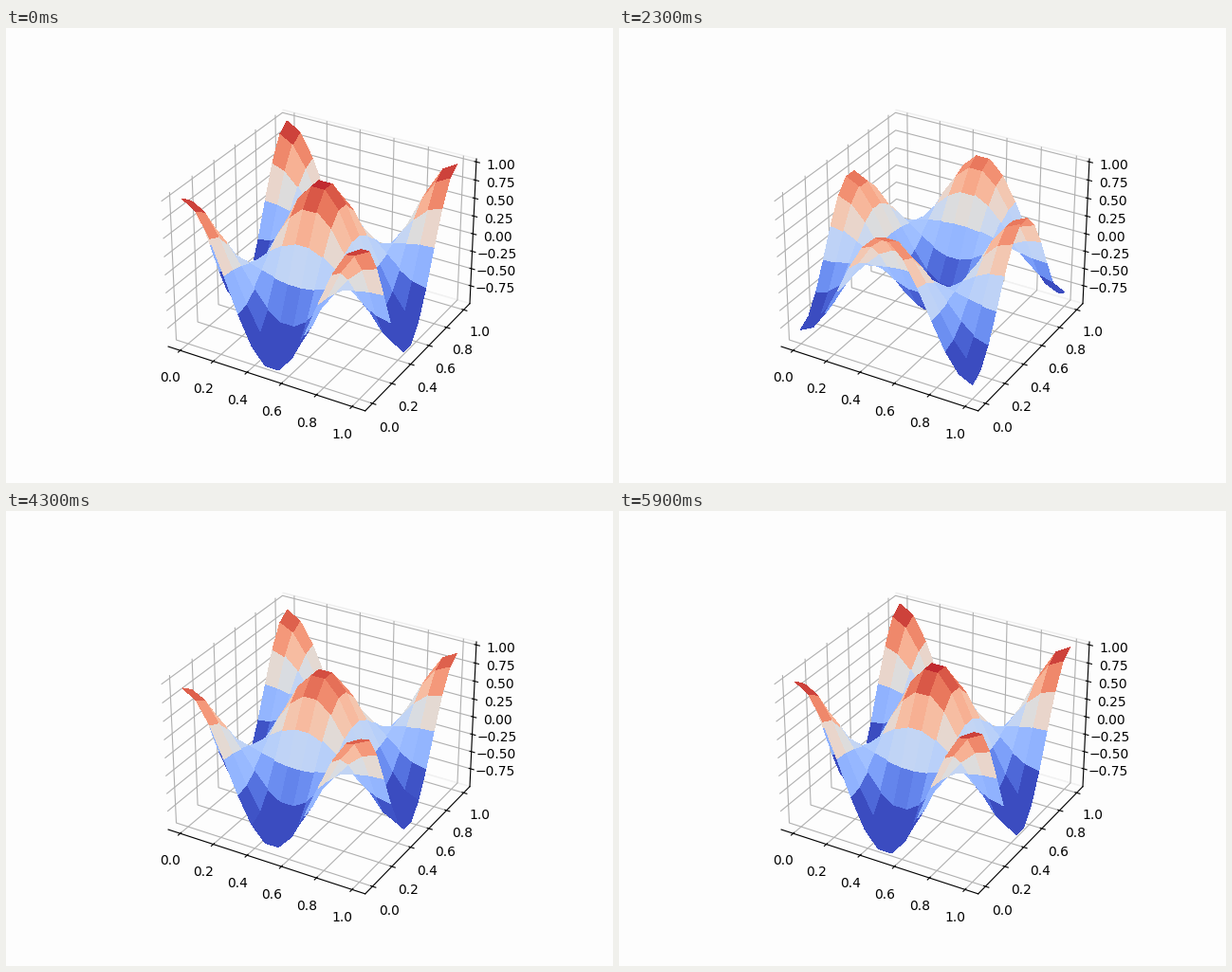
These frames come from a looping animation (640x480 px, 6100 ms). A matplotlib script:

```python
import numpy as np
import matplotlib.pyplot as plt
from matplotlib.animation import FuncAnimation

STEPS = 60      # time steps in one loop, plus one held at the start
PERIOD = 15     # steps in one oscillation
POINTS = 14
PAPER = "#fdfdfd"

grid = np.linspace(0, 1, POINTS)
X, Y = np.meshgrid(grid, grid)
SHAPE = np.cos(2 * np.pi * X) * np.cos(2 * np.pi * Y)

fig = plt.figure(figsize=(6.4, 4.8), dpi=100, facecolor=PAPER)
ax = fig.add_subplot(projection="3d", facecolor=PAPER)


def padded(low, high):
    pad = (high - low) / 48
    return low - pad, high + pad


ax.set_xlim(*padded(-0.05, 1.05))
ax.set_ylim(*padded(-0.05, 1.05))
ax.set_zlim(*padded(SHAPE.min(), SHAPE.max()))
ax.set_zticks(np.arange(-0.75, 1.01, 0.25))

for axis, edge in ((ax.xaxis, PAPER), (ax.yaxis, "#eeeeee"), (ax.zaxis, "#f1f1f1")):
    axis.pane.set_facecolor(PAPER)
    axis.pane.set_edgecolor(edge)
    axis.pane.set_alpha(1)

surfaces = []


def draw(frame):
    while surfaces:
        surfaces.pop().remove()
    step = min(frame + 1, STEPS) if frame else 0
    height = SHAPE * np.cos(2 * np.pi * step / PERIOD)
    surfaces.append(ax.plot_surface(
        X, Y, height, rstride=1, cstride=1, cmap="coolwarm",
        vmin=-0.5, vmax=1, linewidth=0, antialiased=False))
    return surfaces


anim = FuncAnimation(fig, draw, frames=STEPS + 1, interval=100,
                     init_func=lambda: draw(0), repeat=True, repeat_delay=0)
plt.show()
```
